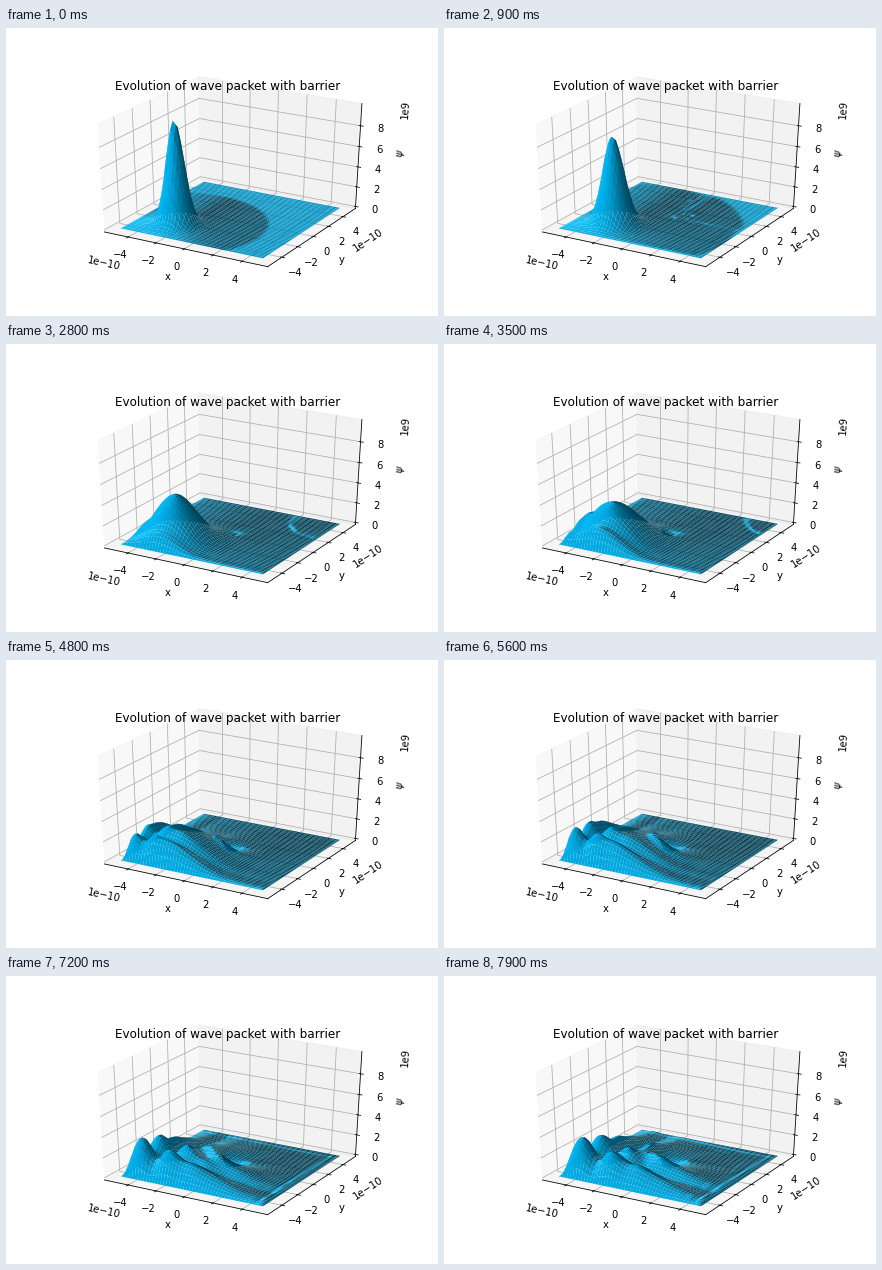
A matplotlib script for the animation above (8000 ms loop, 432x288 px).

```python
import numpy as np
import matplotlib.pyplot as plt
from matplotlib.animation import FuncAnimation

FRAMES, INTERVAL = 80, 100
N, HALF = 50, 5.0             # grid points per side, half width in angstrom
SIGMA, START = 0.4, -2.5      # packet width and centre in angstrom
HOP = 0.011576                # hbar dt / 2m per frame, in square angstrom
BARRIER = 2.0                 # V dt / hbar per frame
SUBSTEPS = 8
UNIT = 1e-10

axis = np.linspace(-HALF, HALF, N)
X, Y = np.meshgrid(axis, axis)
step = axis[1] - axis[0]
potential = np.where((abs(X) < 0.5) & (abs(Y) < 0.5), BARRIER, 0.0)


def rate(psi):
    """Time derivative of psi, with hard walls at the edge of the box."""
    out = np.zeros_like(psi)
    core = psi[1:-1, 1:-1]
    lap = psi[2:, 1:-1] + psi[:-2, 1:-1] + psi[1:-1, 2:] + psi[1:-1, :-2] - 4 * core
    out[1:-1, 1:-1] = 1j * (HOP / step**2 * lap - potential[1:-1, 1:-1] * core)
    return out


def advance(psi):
    h = 1 / SUBSTEPS
    for _ in range(SUBSTEPS):
        k1 = rate(psi)
        k2 = rate(psi + h / 2 * k1)
        k3 = rate(psi + h / 2 * k2)
        k4 = rate(psi + h * k3)
        psi = psi + h / 6 * (k1 + 2 * k2 + 2 * k3 + k4)
    return psi


def evolve():
    r2 = (X - START)**2 + (Y - START)**2
    psi = np.exp(-r2 / (4 * SIGMA**2)) / (np.sqrt(2 * np.pi) * SIGMA * UNIT) + 0j
    waves = []
    for _ in range(FRAMES):
        waves.append(abs(psi))
        psi = advance(psi)
    return waves


waves = evolve()
top = waves[0].max()

fig = plt.figure(figsize=(6, 4), dpi=72)
fig.subplots_adjust(left=0.125, right=0.9, bottom=0.125, top=0.88)
ax = fig.add_subplot(projection="3d")

# Let the cube fill the whole subplot instead of keeping it square.
ax.apply_aspect = lambda position=None: None
ax.set_box_aspect((1, 1, 1), zoom=np.sqrt(3) / 1.8294640721620434)

side = 1.1 * HALF * UNIT * 25 / 24
ax.set_xlim(-side, side)
ax.set_ylim(-side, side)
ax.set_zlim(-top / 48, top * 49 / 48)
ax.set_xticks(np.arange(-4, 5, 2) * UNIT)
ax.set_yticks(np.arange(-4, 5, 2) * UNIT)
ax.set_zticks(np.arange(0, 9, 2) * 1e9)
ax.set_xlabel("x")
ax.set_ylabel("y")
ax.set_zlabel(r"$\psi$")
ax.set_title("Evolution of wave packet with barrier", y=0.92)

surface = None


def draw(i):
    global surface
    if surface is not None:
        surface.remove()
    surface = ax.plot_surface(X * UNIT, Y * UNIT, waves[i],
                              color="deepskyblue", linewidth=0)
    return (surface,)


anim = FuncAnimation(fig, draw, frames=FRAMES, init_func=lambda: (),
                     interval=INTERVAL, repeat=True, repeat_delay=0)
plt.show()
```
